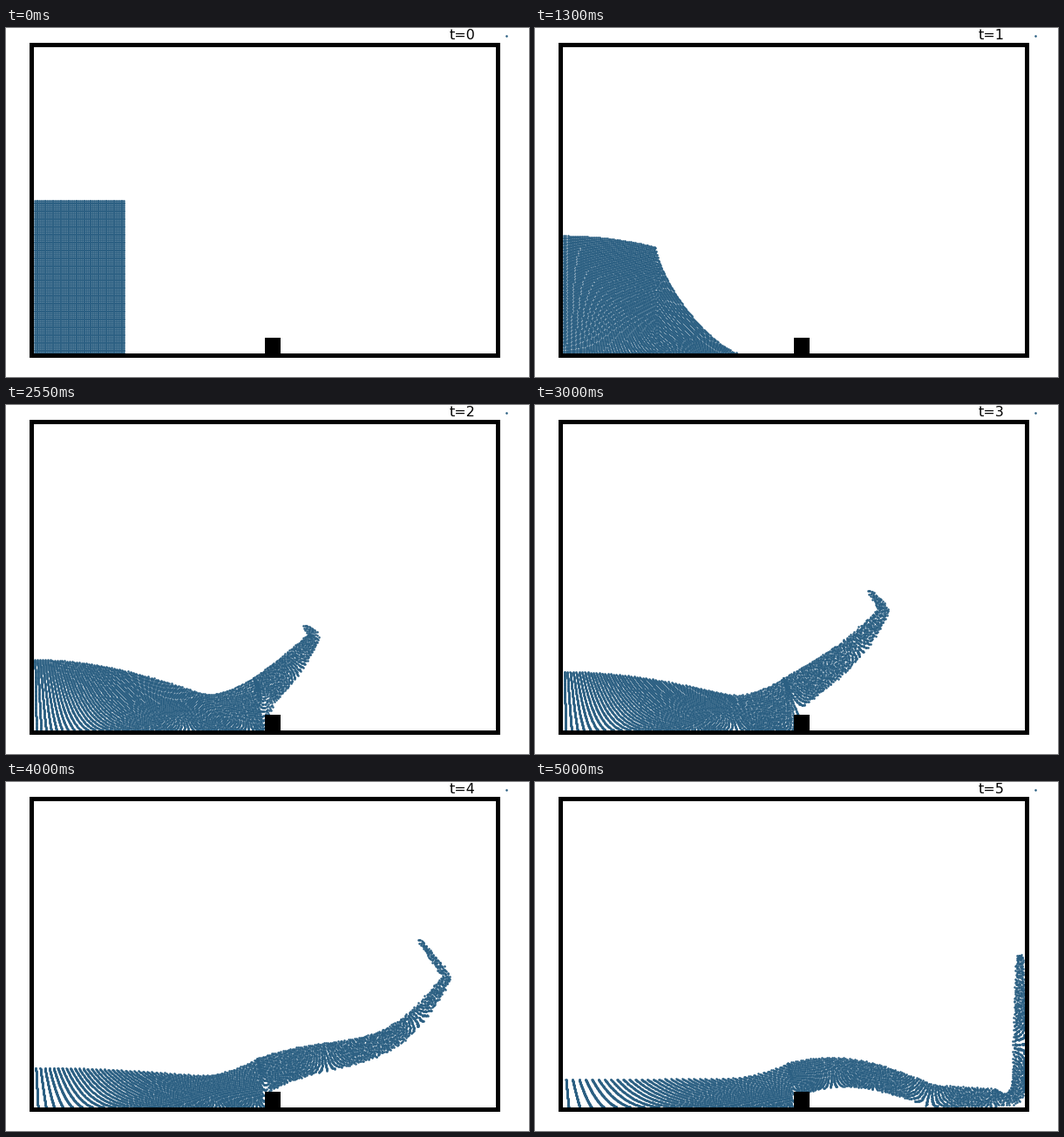
Recreate the animation shown at these times as a matplotlib script. Size 600 px wide and 400 px high, loop 5050 ms.

```python
import numpy as np
import matplotlib.pyplot as plt
from matplotlib.animation import FuncAnimation
from matplotlib.patches import Rectangle

W, H, DPI = 600, 400, 100
FRAMES, STEP = 101, 50
LEFT, RIGHT, FLOOR = 32, 562, 373
DAM_W, DAM_H = 104, 176
BLOCK_X = 297
GAP = 1.8                       # particle spacing
G = 78                          # gravity, px/s^2
HIT, JET = 1.7, 2.1             # front meets the block, jet is formed
LAUNCH = 2.0                    # the first water leaves the block
N_POOL, N_JET, N_TAIL = 420, 60, 20
WATER = "#2b5f82"


def wall_height(t):
    return DAM_H / (1 + 0.178 * t ** 2)


def collapse(t):
    """Upright sections of the falling column, as (lx, ly, ux, uy)."""
    front = min(LEFT + DAM_W + 154 * (np.hypot(1, t) - 1), BLOCK_X)
    corner = min(LEFT + DAM_W + 1.1 * t ** 3, front)
    top = wall_height(t)
    shoulder = top * (1 - 0.043 * t ** 3)

    x = np.linspace(LEFT, front, N_POOL + N_JET + N_TAIL)
    u = np.clip((x - corner) / max(front - corner, 1e-6), 0, 1)
    m = 0.58 + 0.075 * t ** 3
    slope = shoulder * (1 - u ** m) ** (1 / m)
    crown = top - (top - shoulder) * ((x - LEFT) / (corner - LEFT)) ** 2
    h = np.where(x < corner, crown, slope)
    return np.array([x, np.full_like(x, FLOOR), x, FLOOR - h])


def jet_path(t):
    """Centre line and width of the jet: a ballistic streak with a curled tip."""
    born = np.linspace(t, LAUNCH, N_JET)
    age = t - born
    since = born - LAUNCH
    x = 296 + (94 + 11 * np.exp(-since / 0.3)) * age
    y = (323 + 6 * since - 128 * (1 + since) ** -1.15 * age
         + G / 2 * age ** 2)
    width = (16 + 24 * (1 - np.exp(-since / 0.25))) / (1 + 0.35 * age)

    e = np.linspace(0, 1, N_TAIL + 1)[1:]
    tip_x = 383 + 91 * (t - 3)
    tip_y = 213 - 71 * (t - 3) + G / 2 * (t - 3) ** 2
    x = np.append(x, x[-1] + e * (tip_x - x[-1]))
    y = np.append(y, y[-1] + e * (tip_y - y[-1]))
    width = np.append(width, width[-1] + e * (5 - width[-1]))

    # Water that meets the right wall is driven up along it.
    y -= 1.5 * np.maximum(x - (RIGHT - 12), 0)
    x = np.minimum(x, RIGHT - 6)
    return x, np.minimum(y, FLOOR - 1 - width / 2), width


def pool_and_jet(t):
    x, y, width = jet_path(t)
    soft = np.ones(7) / 7
    tx = np.convolve(np.pad(np.gradient(x), 3, "edge"), soft, "valid")
    ty = np.convolve(np.pad(np.gradient(y), 3, "edge"), soft, "valid")
    half = width / 2 / np.maximum(np.hypot(tx, ty), 1e-6)
    jet = np.array([x - ty * half, y + tx * half, x + ty * half, y - tx * half])

    # The floor layer runs ahead of the surface.
    q = np.linspace(0, 1, N_POOL)
    lx = LEFT + (BLOCK_X - 1 - LEFT) * q
    ux = LEFT + (jet[2, 0] - LEFT) * q ** 1.15
    low = 46 - 2.5 * t
    fall = np.clip(1 - ((ux - LEFT) / 205) ** 2, 0, 1) ** 1.2
    rise = np.clip((ux - 215) / (jet[2, 0] - 215), 0, 1) ** 2
    h = low + (wall_height(t) - low) * fall + (FLOOR - jet[3, 0] - low) * rise
    pool = np.array([lx, np.full_like(lx, FLOOR), ux, FLOOR - h])
    return np.hstack([pool, jet])


def sections(t):
    if t <= HIT:
        return collapse(t)
    shape = pool_and_jet(max(t, JET))
    if t < JET:
        w = ((t - HIT) / (JET - HIT)) ** 1.5
        shape = (1 - w) * collapse(t) + w * shape
    return shape


# Material coordinates of the particles: a across, b upwards.
cols, rows = round(DAM_W / GAP), round(DAM_H / GAP)
a, b = np.meshgrid((np.arange(cols) + 0.5) / cols,
                   (np.arange(rows) + 0.5) / rows)
a, b = a.ravel(), b.ravel()
jitter = np.random.default_rng(4).uniform(-1, 1, (2, a.size))
ALPHA = np.linspace(0, 1, 801)


def line_weight(alpha, lean):
    """Material on the slanted line that starts on the floor at alpha."""
    top = np.minimum(1, (1 - alpha) / np.maximum(lean * alpha ** 2, 1e-9))
    return top + lean * alpha * top ** 2


def cumulative(parts):
    c = np.concatenate([[0], np.cumsum(parts)])
    return c / c[-1]


def particles(t):
    # Lines of material lean forward as the floor layer runs ahead.
    lean = min(0.75 * t ** 2, 6)
    alpha = 2 * a / (1 + np.sqrt(1 + 4 * lean * a * b))
    h = (b + lean * alpha * b ** 2) / np.maximum(line_weight(alpha, lean), 1e-9)
    weight = line_weight(ALPHA, lean)
    share = np.interp(alpha, ALPHA, cumulative(weight[1:] + weight[:-1]))

    # Spread them evenly over the area of the water.
    lx, ly, ux, uy = strip = sections(t)
    area = np.abs((ux[1:] - lx[:-1]) * (uy[:-1] - ly[1:])
                  - (uy[1:] - ly[:-1]) * (ux[:-1] - lx[1:]))
    s = np.arange(lx.size)
    at = np.interp(share, cumulative(area), s)
    lx, ly, ux, uy = (np.interp(at, s, c) for c in strip)

    rough = np.clip(t - 2, 0, 1) * np.clip(2 * share - 1, 0, 1)
    x = lx + h * (ux - lx) + rough * jitter[0]
    y = ly + h * (uy - ly) + rough * jitter[1]
    return np.clip(x, LEFT + 0.5, RIGHT - 1), np.clip(y, 22, FLOOR - 1)


fig = plt.figure(figsize=(W / DPI, H / DPI), dpi=DPI, facecolor="white")
ax = fig.add_axes([0, 0, 1, 1])
ax.set_xlim(0, W)
ax.set_ylim(H, 0)
ax.axis("off")


def block(x0, y0, x1, y1):
    ax.add_patch(Rectangle((x0, y0), x1 - x0, y1 - y0, fc="black", lw=0,
                           zorder=3))


block(LEFT - 5, 17, RIGHT + 5, 22)
block(LEFT - 5, FLOOR, RIGHT + 5, FLOOR + 5)
block(LEFT - 5, 17, LEFT, FLOOR + 5)
block(RIGHT, 17, RIGHT + 5, FLOOR + 5)
block(BLOCK_X, FLOOR - 18, BLOCK_X + 18, FLOOR + 1)

style = dict(marker="o", ls="", ms=2.6 * 72 / DPI, mew=0, color=WATER,
             antialiased=False, zorder=2)
dots, = ax.plot([], [], **style)
ax.plot([573.5], [8.5], **style)
label = ax.text(509, 13, "", family="DejaVu Sans", fontsize=16 * 72 / DPI,
                color="black", va="baseline")


def update(i):
    ms = i * STEP
    # The first picture is held for two steps.
    dots.set_data(*particles(ms / 1000 if i > 1 else 0))
    label.set_text(f"t={ms // 1000}")
    return dots, label


anim = FuncAnimation(fig, update, frames=FRAMES, interval=STEP, repeat=True,
                     repeat_delay=0, blit=False)
plt.show()
```
